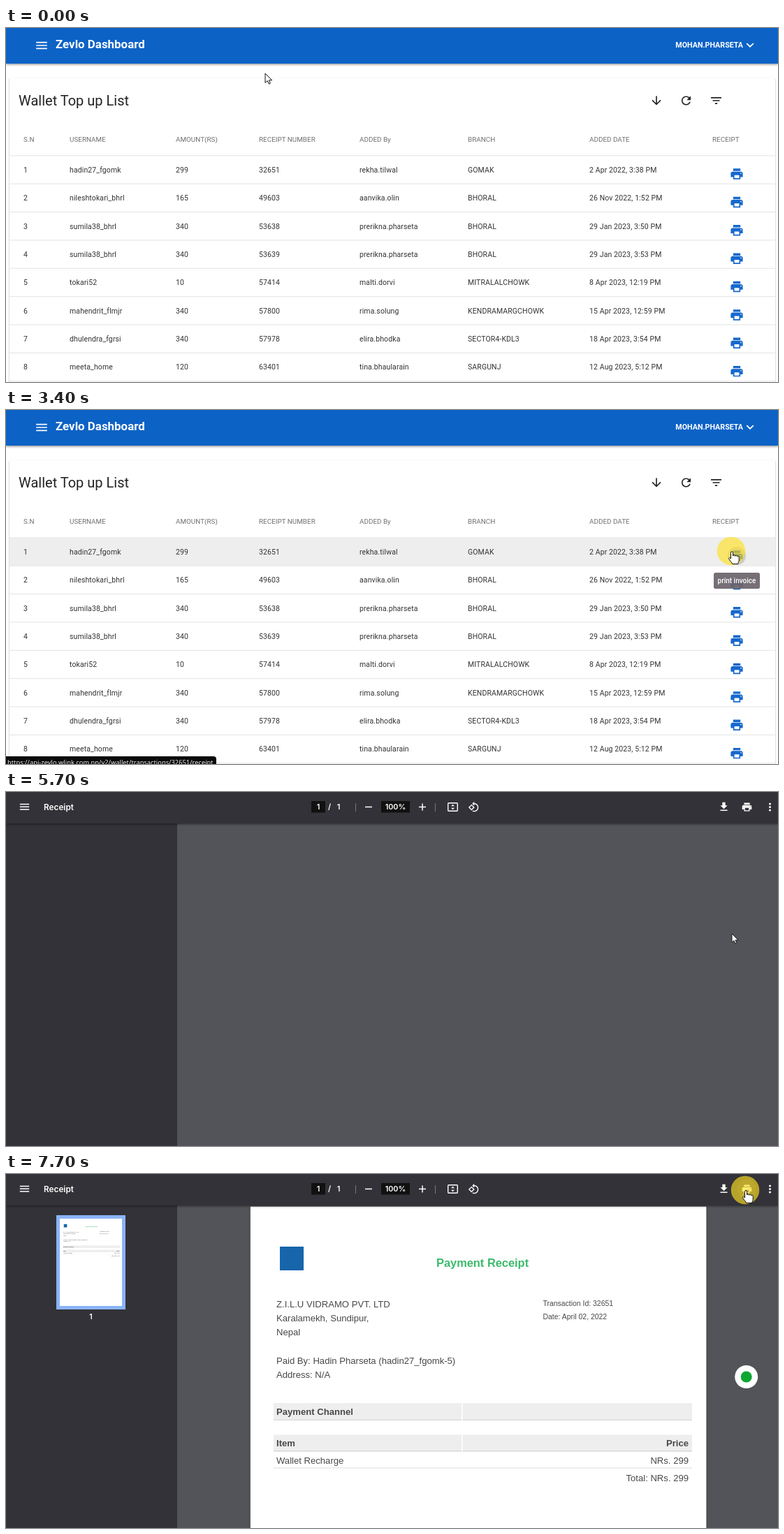
These frames come from a looping animation (1105x507 px, 8 s). An HTML page:

```html
<!DOCTYPE html>
<html lang="en">
<head>
<meta charset="utf-8">
<title>Wallet receipt</title>
<style>
html, body { margin: 0; width: 100%; height: 100%; overflow: hidden; background: #fff }
svg { display: block; width: 100vw; height: 100vh }
#list { font-family: Roboto, sans-serif }
.cell { font-size: 10.5px; letter-spacing: .11px; fill: #333 }
.head { font-size: 9.9px; fill: #707070 }
#bar { font: 600 11.8px Inter, sans-serif; fill: #fff }
#page { font: 13.1px "Liberation Sans", Arial, sans-serif; fill: #484848 }
.b { font-weight: 700 }
.end { text-anchor: end }
.mid { text-anchor: middle }
.small { font-size: 10.44px }
</style>
</head>
<body>
<svg id="stage" viewBox="0 0 1105 507"></svg>
<script>
const ICONS = {
  menu: 'M3 18h18v-2H3v2zm0-5h18v-2H3v2zm0-7v2h18V6H3z',
  more: 'M16.59 8.59L12 13.17 7.41 8.59 6 10l6 6 6-6z',
  down: 'M20 12l-1.41-1.41L13 16.17V4h-2v12.17l-5.58-5.59L4 12l8 8 8-8z',
  refresh: 'M17.65 6.35C16.2 4.9 14.21 4 12 4c-4.42 0-7.99 3.58-7.99 8s3.57 8 7.99 8c3.73 0 6.84-2.55 7.73-6h-2.08c-.82 2.33-3.04 4-5.65 4-3.31 0-6-2.69-6-6s2.69-6 6-6c1.66 0 3.14.69 4.22 1.78L13 11h7V4l-2.35 2.35z',
  filter: 'M10 18h4v-2h-4v2zM3 6v2h18V6H3zm3 7h12v-2H6v2z',
  print: 'M19 8H5c-1.66 0-3 1.34-3 3v6h4v4h12v-4h4v-6c0-1.66-1.34-3-3-3zm-3 11H8v-5h8v5zm3-7c-.55 0-1-.45-1-1s.45-1 1-1 1 .45 1 1-.45 1-1 1zm-1-9H6v4h12V3z',
  save: 'M19 9h-4V3H9v6H5l7 7 7-7zM5 18v2h14v-2H5z',
  rotate: 'M7.34 6.41L.86 12.9l6.49 6.48 6.49-6.48-6.5-6.49zM3.69 12.9l3.66-3.66L11 12.9l-3.66 3.66-3.65-3.66zm15.67-6.26C17.61 4.88 15.3 4 13 4V.76L8.76 5 13 9.24V6c1.79 0 3.58.68 4.95 2.05 2.73 2.73 2.73 7.17 0 9.9C16.58 19.32 14.79 20 13 20c-.97 0-1.94-.21-2.84-.61l-1.49 1.49C10.02 21.62 11.51 22 13 22c2.3 0 4.61-.88 6.36-2.64 3.52-3.51 3.52-9.21 0-12.72z'
};
const text = (x, y, s, attrs = '') => `<text x="${x}" y="${y}" ${attrs}>${s}</text>`;
const rect = (x, y, w, h, fill, attrs = '') =>
  `<rect x="${x}" y="${y}" width="${w}" height="${h}" fill="${fill}" ${attrs}/>`;
const circle = (x, y, r, fill, attrs = '') => `<circle cx="${x}" cy="${y}" r="${r}" fill="${fill}" ${attrs}/>`;
const icon = (name, x, y, scale, fill) =>
  `<path d="${ICONS[name]}" fill="${fill}" transform="translate(${x} ${y}) scale(${scale}) translate(-12 -12)"/>`;

const ROW_TOP = 182.8, ROW_H = 40.36;
const COLS = [25, 91, 243, 362, 506, 661, 835, 1011];
const HEADS = ['S.N', 'USERNAME', 'AMOUNT(RS)', 'RECEIPT NUMBER', 'ADDED By', 'BRANCH', 'ADDED DATE', 'RECEIPT'];
const ROWS = `hadin27_fgomk|299|32651|rekha.tilwal|GOMAK|2 Apr 2022, 3:38 PM
nileshtokari_bhrl|165|49603|aanvika.olin|BHORAL|26 Nov 2022, 1:52 PM
sumila38_bhrl|340|53638|prerikna.pharseta|BHORAL|29 Jan 2023, 3:50 PM
sumila38_bhrl|340|53639|prerikna.pharseta|BHORAL|29 Jan 2023, 3:53 PM
tokari52|10|57414|malti.dorvi|MITRALALCHOWK|8 Apr 2023, 12:19 PM
mahendrit_flmjr|340|57800|rima.solung|KENDRAMARGCHOWK|15 Apr 2023, 12:59 PM
dhulendra_fgrsi|340|57978|elira.bhodka|SECTOR4-KDL3|18 Apr 2023, 3:54 PM
meeta_home|120|63401|tina.bhaularain|SARGUNJ|12 Aug 2023, 5:12 PM`.split('\n').map(r => r.split('|'));

const tableRow = (cells, i) => {
  const y = ROW_TOP + i * ROW_H;
  return [i + 1, ...cells].map((s, c) => text(COLS[c], y + 24, s, 'class="cell"')).join('') +
    rect(5, y + ROW_H - .5, 1096, 1, '#e4e4e4') + icon('print', 1046, y + 26.3, .86, '#1668cc');
};

const list = `<g id="list">
  ${rect(0, 0, 1105, 507, '#fff')}
  ${rect(5, 72, 1096, 500, '#fff', 'filter="url(#cardShadow)"')}
  ${rect(0, 0, 1105, 51, '#1062c6', 'filter="url(#barShadow)"')}
  ${icon('menu', 51, 25, .87, '#fff')}
  ${text(71, 29, 'Zevlo Dashboard', 'class="b" font-size="16.9" fill="#fff"')}
  ${text(1055, 28, 'MOHAN.PHARSETA', 'class="end" font-size="10.7" font-weight="600" fill="#fff"')}
  ${icon('more', 1065, 24.5, .9, '#fff')}
  ${text(18, 110.5, 'Wallet Top up List', 'font-size="20" fill="#222"')}
  ${icon('down', 931, 104, .82, '#222')}
  ${icon('refresh', 973.5, 104, .82, '#222')}
  ${icon('filter', 1016.5, 104, .83, '#222')}
  ${HEADS.map((s, c) => text(COLS[c], 163.3, s, 'class="head"')).join('')}
  ${rect(5, ROW_TOP - .5, 1096, 1, '#e4e4e4')}
  ${rect(5, ROW_TOP, 1096, ROW_H, '#eee', 'id="hover"')}
  ${ROWS.map(tableRow).join('')}
  ${circle(1046, 209, 13, 'rgba(0,0,0,.14)', 'id="ripple"')}
  <g id="tip">${rect(1013, 233, 66, 23, '#6c656c', 'rx="2.5" opacity=".93"')}
    ${text(1046, 248, 'print invoice', 'class="mid" font-size="10" font-weight="500" fill="#fff"')}</g>
  <g id="status"><path d="M0 496H297q4 0 4 4V507H0z" fill="#0a0a0a"/>
    ${text(2, 508, 'https://api-zevlo.wlink.com.np/v2/wallet/transactions/32651/receipt',
      'font-family="Noto Sans, sans-serif" font-size="9.3" fill="#eee"')}</g>
</g>`;

const band = (y, h) => [[383, 269], [653.5, 328.5]].map(([x, w]) =>
  rect(x, y, w, h, '#eee') + rect(x, y + h - 1.3, w, 1.3, '#d8d8d8')).join('');

const page = `<g id="page">
  ${rect(349.8, 46.6, 652.6, 916, '#fff')}
  ${rect(392, 104, 34, 34, '#1765ab')}
  ${text(616, 133.4, 'Payment Receipt', 'class="b" font-size="16.4" fill="#3dba6c"')}
  ${text(387, 191, 'Z.I.L.U VIDRAMO PVT. LTD')}
  ${text(387, 211, 'Karalamekh, Sundipur,')}
  ${text(387, 230.7, 'Nepal')}
  ${text(768.5, 188.5, 'Transaction Id: 32651', 'class="small"')}
  ${text(768.5, 208.3, 'Date: April 02, 2022', 'class="small"')}
  ${text(387, 271.7, 'Paid By: Hadin Pharseta (hadin27_fgomk-5)')}
  ${text(387, 291.5, 'Address: N/A')}
  ${band(328, 25)}${band(373.5, 24)}
  ${text(387, 345, 'Payment Channel', 'class="b"')}
  ${text(387, 390, 'Item', 'class="b"')}
  ${text(977, 390, 'Price', 'class="b end"')}
  ${text(387, 415, 'Wallet Recharge')}
  ${text(977, 415, 'NRs. 299', 'class="end"')}
  ${rect(383, 420.5, 599, 1, '#ddd')}
  ${text(977, 439.7, 'Total: NRs. 299', 'class="end"')}
</g>`;

const viewer = `<g id="viewer">
  ${rect(0, 0, 1105, 507, '#535459')}
  <g id="sheet">${rect(350, 47, 652, 916, '#333', 'filter="url(#pageShadow)"')}${page}</g>
  ${rect(0, 45, 245, 462, '#323238')}
  <g id="thumb">${rect(72, 59, 99, 135, '#8ab4f8')}
    <use href="#page" transform="translate(77 64) scale(.1365) translate(-350 -47)"/>
    ${text(121.5, 208, '1', 'class="mid" font-family="Inter, sans-serif" font-size="10.5" font-weight="600" fill="#fff"')}</g>
  <g id="bar">
    ${rect(0, 0, 1105, 45, '#323238', 'filter="url(#barShadow)"')}
    ${icon('menu', 26.5, 21.2, .74, '#fff')}
    ${text(54, 25.5, 'Receipt')}
    ${rect(437, 13, 20, 16.5, '#111')}${rect(537, 13, 41, 16.5, '#111')}
    <g class="mid" font-size="11">
      ${text(447, 25, '1')}${text(463, 25, '/')}${text(476, 25, '1')}
      ${text(557.5, 25, '100%', 'font-size="10.8"')}</g>
    ${rect(500, 16, 1, 12, '#77787c')}${rect(614, 16, 1, 12, '#77787c')}
    ${rect(514, 20.7, 10, 1.5, '#fff')}${rect(591, 20.7, 10, 1.5, '#fff')}${rect(595.3, 16.5, 1.5, 10, '#fff')}
    ${rect(632.7, 15.7, 13.6, 11.6, 'none', 'rx="1" stroke="#fff" stroke-width="1.4"')}
    <path d="M637 20.3l2.5-2.6 2.5 2.6zM637 22.7l2.5 2.6 2.5-2.6z"/>
    ${icon('rotate', 669.5, 21.5, .68, '#fff')}
    ${icon('save', 1027.5, 21.3, .72, '#fff')}
    ${circle(1060.5, 21.5, 14, 'rgba(255,255,255,.06)', 'id="barHover"')}
    ${icon('print', 1060.5, 21.5, .68, '#fff')}
    ${[17, 21.5, 26].map(y => circle(1093.5, y, 1.5, '#fff')).join('')}
  </g>
  <g id="badge">${circle(1059.7, 290.5, 16.5, '#fff')}${circle(1059.7, 290.5, 8, '#0da832')}</g>
</g>`;

const shadow = (id, dy, blur, opacity) => `<filter id="${id}" x="-5%" y="-20%" width="110%" height="160%">
  <feDropShadow dx="0" dy="${dy}" stdDeviation="${blur}" flood-opacity="${opacity}"/></filter>`;

document.getElementById('stage').innerHTML = `<defs>
  ${shadow('barShadow', 1.5, 1.8, .4)}${shadow('cardShadow', 1, 1, .32)}${shadow('pageShadow', 0, 1.8, .6)}</defs>
  ${list}${rect(0, 0, 1105, 507, '#202226', 'id="blank"')}${viewer}
  <g id="pointer">${circle(-1, -1, 20.3, 'rgba(255,225,35,.65)', 'id="click"')}
    <g fill="#fff" stroke="#111" stroke-linejoin="round">
      <path id="arrow" d="M0 0V13.5L3.2 10.6 5.3 15.2 7.4 14.3 5.4 9.8H9.7Z"/>
      <path id="hand" d="M-1.5 1.3a1.5 1.5 0 0 1 3 0V6a1.5 1.5 0 0 1 3 .4a1.5 1.5 0 0 1 3 .6a1.4 1.4 0 0 1 2.7 .6V12c0 2-1.2 3-1.5 5.5H.5C.2 15.5-2 14-4.2 10.5c-.9-1.5 1-2.6 2-1.4l.7 1Z"/>
    </g></g>`;

const $ = id => document.getElementById(id);
const show = (id, on) => $(id).setAttribute('visibility', on ? 'inherit' : 'hidden');
const clamp = v => Math.min(1, Math.max(0, v));
const mix = (a, b, k) => a + (b - a) * k;

// Pointer legs: start time, end time, target x, target y
const LEGS = [[0, 700, 250, 189], [1100, 2100, 1039, 203], [6600, 7300, 1059, 24]];

function pointerAt(t) {
  let x = 371, y = 65;
  for (const [t0, t1, tx, ty] of LEGS) {
    const p = clamp((t - t0) / (t1 - t0)), k = p * p * (3 - 2 * p);
    x = mix(x, tx, k);
    y = mix(y, ty, k);
  }
  return [x, y];
}

function draw(t) {
  const [x, y] = pointerAt(t);
  const inList = t < 3700, inViewer = t >= 5700;
  const onPrint = inList && x > 1033, onBarPrint = inViewer && y < 36;
  const row = Math.floor((y - ROW_TOP) / ROW_H);

  show('list', inList);
  show('hover', inList && row >= 0);
  $('hover').setAttribute('y', ROW_TOP + Math.max(0, row) * ROW_H);
  show('ripple', onPrint);
  show('status', onPrint);
  $('tip').setAttribute('opacity', clamp((t - 2100) / 400));

  $('blank').setAttribute('fill', t < 4900 ? '#202226' : '#535759');
  show('blank', !inList);

  show('viewer', inViewer);
  show('sheet', inViewer && t >= 5900);
  show('thumb', inViewer && t >= 6000);
  show('badge', inViewer && t >= 6400);
  show('barHover', onBarPrint);

  const hand = onPrint || onBarPrint;
  $('pointer').setAttribute('transform', `translate(${x} ${y})`);
  $('arrow').setAttribute('transform', inList ? '' : 'scale(.92)');
  show('arrow', !hand);
  show('hand', hand);
  show('click', (t >= 3200 && inList) || t >= 7700);
}

function tick() {
  draw(Math.floor(performance.now() % 8000 / 100) * 100);
  requestAnimationFrame(tick);
}
tick();
</script>
</body>
</html>
```
